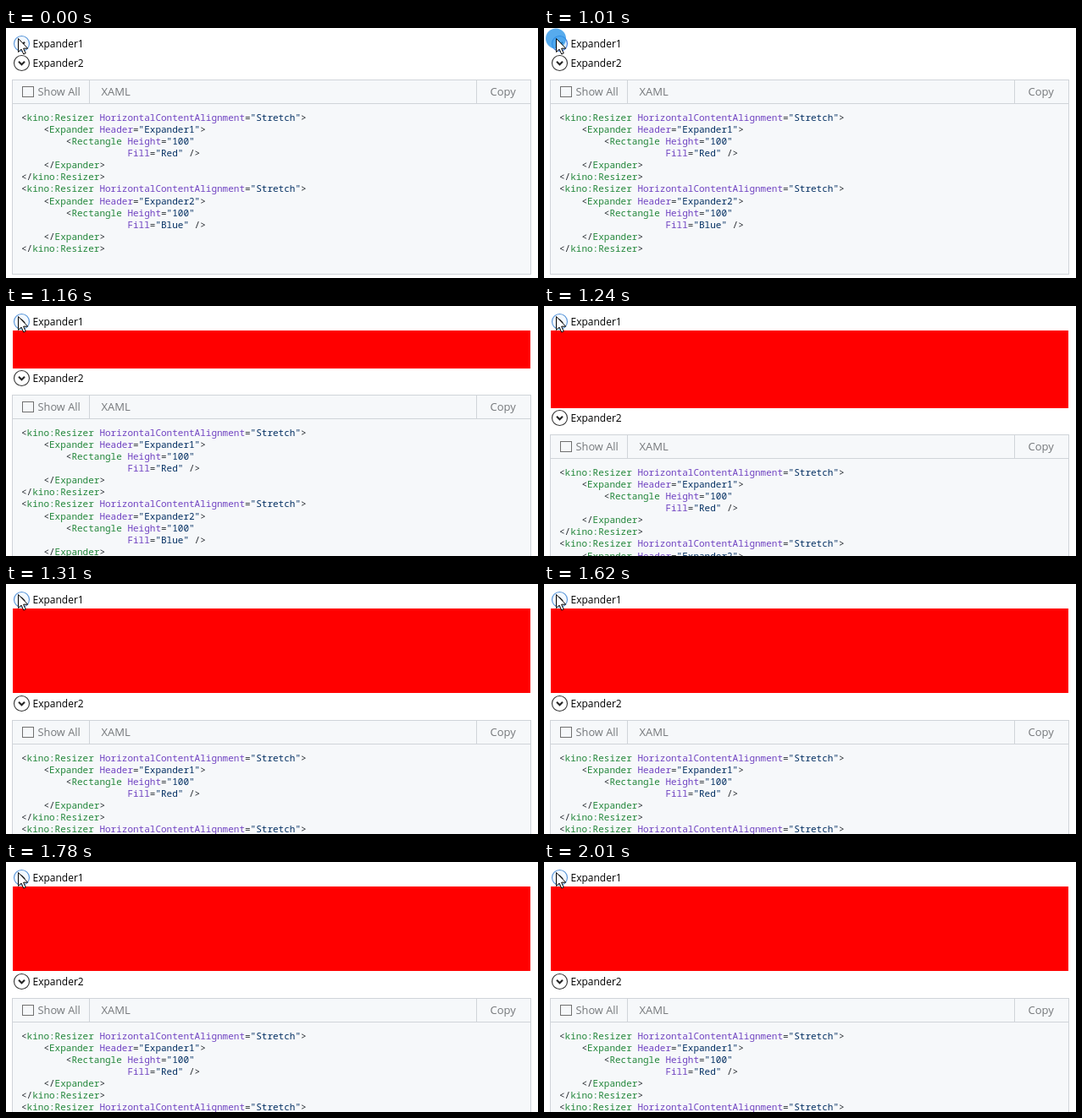
Write an HTML page with a canvas that moves like this. It is 628 px wide and 296 px high and loops after 2160 ms.

```html
<!DOCTYPE html>
<html lang="en">
<head>
<meta charset="utf-8">
<title>Expander</title>
<style>
  html, body { margin: 0; width: 100%; height: 100%; overflow: hidden; background: #fff; }
  canvas { display: block; width: 628px; height: 296px; }
</style>
</head>
<body>
<canvas id="stage" width="628" height="296"></canvas>
<script>
const ctx = document.getElementById('stage').getContext('2d');
const LOOP = 2160;
const UI = '"Open Sans", "Noto Sans", sans-serif';
const MONO = '"Noto Sans Mono", "DejaVu Sans Mono", monospace';
const CHAR = 6.6, LINE = 14.08;
const INK = { tag: '#22863a', attr: '#6f42c1', string: '#032f62', mark: '#24292e' };

const block = (n, fill) => [
  '<kino:Resizer HorizontalContentAlignment="Stretch">',
  `    <Expander Header="Expander${n}">`,
  '        <Rectangle Height="100"',
  `                   Fill="${fill}" />`,
  '    </Expander>',
  '</kino:Resizer>'
];
const code = [...block(1, 'Red'), ...block(2, 'Blue')];

// Height of the opened content; it opens in hard steps.
const opened = t => t < 1160 ? 0 : t < 1240 ? 44.5 : t < 1310 ? 91.5 : 100;

function text(str, x, y, size, color, family = UI) {
  ctx.font = `${size}px ${family}`;
  ctx.fillStyle = color;
  ctx.fillText(str, x, y);
}

function rect(x, y, w, h, color) {
  ctx.fillStyle = color;
  ctx.fillRect(x, y, w, h);
}

function path(points, close) {
  ctx.beginPath();
  points.forEach(([x, y]) => ctx.lineTo(x, y));
  if (close) ctx.closePath();
}

function disc(x, y, r, fill) {
  ctx.beginPath();
  ctx.arc(x, y, r, 0, Math.PI * 2);
  ctx.fillStyle = fill;
  ctx.fill();
}

function expander(label, y, stroke, fill, up) {
  const x = 18.5, dir = up ? -1 : 1;
  disc(x, y, 9, fill);
  ctx.strokeStyle = stroke;
  ctx.lineWidth = 1.1;
  ctx.stroke();
  path([[x - 3.5, y - 1.7 * dir], [x, y + 1.8 * dir], [x + 3.5, y - 1.7 * dir]]);
  ctx.strokeStyle = '#222';
  ctx.lineWidth = 2;
  ctx.stroke();
  text(label, 31.5, y + 4.5, 12, '#000');
}

function codeLine(line, y) {
  for (const { 0: token, index } of line.matchAll(/"[^"]*"|[\w:]+|[<>\/=]+/g)) {
    const kind = token[0] === '"' ? 'string'
      : !/\w/.test(token) ? 'mark'
      : /[<\/]/.test(line[index - 1]) ? 'tag' : 'attr';
    text(token, 18 + index * CHAR, y, 11, INK[kind], MONO);
  }
}

function panel(top) {
  const edge = '#d0d4d9', gray = '#75787b';
  rect(7, top, 613, 231, edge);
  rect(8, top + 1, 611, 229, '#f6f8fa');
  rect(8, top + 28, 611, 1, edge);
  rect(98, top + 1, 1, 27, edge);
  rect(555, top + 1, 1, 27, edge);
  ctx.strokeStyle = '#707070';
  ctx.lineWidth = 1;
  ctx.strokeRect(19.5, top + 8.5, 13, 12);
  text('Show All', 37.5, top + 19, 12.8, gray);
  text('XAML', 112.5, top + 19, 13, gray);
  text('Copy', 571.5, top + 19, 13, gray);
  code.forEach((line, i) => codeLine(line, Math.round(top + 49 + i * LINE)));
}

function cursor(x, y) {
  path([[0, 0], [0, 16], [3.6, 12.6], [6.3, 18.5], [8.7, 17.4], [6.1, 11.7], [11.2, 11.7]]
    .map(([dx, dy]) => [x + dx, y + dy]), true);
  ctx.fillStyle = '#fff';
  ctx.fill();
  ctx.strokeStyle = '#000';
  ctx.lineWidth = 1;
  ctx.stroke();
}

function draw(t) {
  const height = opened(t), shift = Math.floor(height);
  const pressed = t >= 1010 && t < 1160;
  rect(0, 0, 628, 296, '#fff');
  expander('Expander1', 18.5, pressed ? '#3c77dd' : '#5593d8', pressed ? '#d9ecff' : '#f3f9ff', height > 0);
  rect(8, 29, 611, Math.ceil(height), '#f00');
  expander('Expander2', 41.5 + shift, '#333', '#fff', false);
  panel(61 + shift);
  if (pressed) disc(14, 12.5, 12, 'rgba(40, 148, 232, 0.78)');
  cursor(14.5, 12.5);
}

function frame() {
  draw(performance.now() % LOOP);
  requestAnimationFrame(frame);
}
frame();
</script>
</body>
</html>
```
